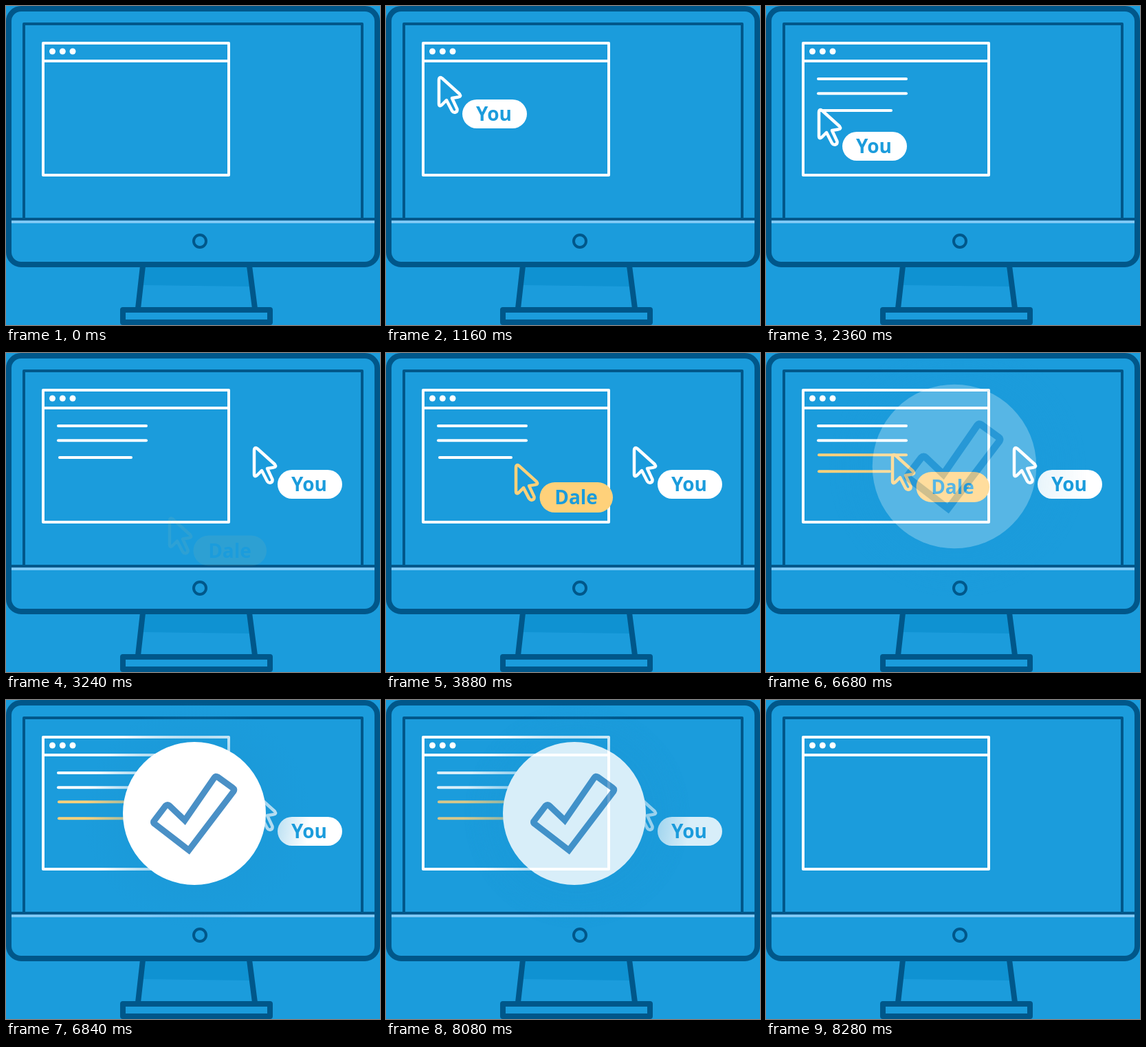
Write an HTML page that moves like this. It is 544 by 464 pixels and loops after 9520 ms.

```html
<!DOCTYPE html>
<html lang="en">
<head>
<meta charset="utf-8">
<title>Working together</title>
<style>
html, body { margin: 0; height: 100%; overflow: hidden; background: #1b9cdc; }
svg { display: block; width: 544px; height: 464px; }
text { font: 700 28px "Open Sans", "Noto Sans", sans-serif; fill: #1b9cdc; text-anchor: middle; }
#lines path { stroke-width: 4; stroke-linecap: round; }
</style>
</head>
<body>
<svg viewBox="0 0 544 464" fill="none">
  <defs>
    <path id="arrow" stroke-width="4.5" stroke-linejoin="round"
      d="M3 7Q3 1 7.5 4L33 27Q36 31 31 31.5L22 33L29.500 49Q30 52.500 27 53.500Q24 54.500 22 51.500L14 36L7 43Q3 46 3 41Z"/>
    <radialGradient id="glow">
      <stop offset=".6" stop-color="#1b97d5" stop-opacity=".4"/>
      <stop offset="1" stop-color="#1b97d5" stop-opacity="0"/>
    </radialGradient>
  </defs>

  <!-- monitor -->
  <path fill="#0f92d2" d="M201 380H353L356 408L199 406Z"/>
  <g stroke="#00578a">
    <path stroke-width="8" d="M199 378L192 440M354 378L362 440"/>
    <rect x="170" y="442" width="214" height="18" stroke-width="8" stroke-linejoin="round"/>
    <rect x="4" y="4" width="536" height="372" rx="18" stroke-width="8"/>
    <path stroke-width="4" stroke-linejoin="round" d="M26 310V26H518V310M8 310H536"/>
    <circle cx="282" cy="342" r="9" stroke-width="4"/>
  </g>
  <path stroke="#7fc8f5" stroke-width="4" d="M8 314H536"/>

  <!-- window -->
  <path stroke="#fff" stroke-width="4" stroke-linejoin="round" d="M54 54H324V246H54ZM54 80H324"/>
  <g fill="#fff">
    <circle cx="67.500" cy="66" r="4.500"/><circle cx="82.300" cy="66" r="4.500"/><circle cx="97" cy="66" r="4.500"/>
  </g>

  <g id="action">
    <g id="lines"></g>
    <g id="you">
      <use href="#arrow" stroke="#fff"/>
      <rect x="37" y="35" width="94" height="42" rx="21" fill="#fff"/>
      <text x="83" y="65.500">You</text>
    </g>
    <g id="mate">
      <use href="#arrow" stroke="#ffd17a"/>
      <rect x="37.500" y="28" width="106.500" height="44" rx="22" fill="#ffd17a"/>
      <text x="90.500" y="60">Dale</text>
    </g>
    <g id="done">
      <circle cx="278" cy="168" r="165" fill="url(#glow)"/>
      <circle cx="274" cy="165" r="104" fill="#fff"/>
      <path stroke="#4a90c6" stroke-width="9"
        d="M260 175L238 154Q235 151 232 154L216 175Q213 178 216 180L266 218.500L331 133Q333 130 330 128L308 112Q305 110 303 113Z"/>
    </g>
  </g>
</svg>
<script>
const LOOP = 9520, STEP = 40;
const $ = id => document.getElementById(id);
const clamp = v => Math.min(1, Math.max(0, v));
const ease = (p, n) => p < .5 ? (2 * p) ** n / 2 : 1 - (2 - 2 * p) ** n / 2;

// progress of a change whose first of n steps shows at `start`
const prog = (t, start, n) => clamp(((t - start) / STEP + 1) / n);

const lines = [
  { y: 106, x0: 76, x1: 204, start: 1320, color: '#fff' },
  { y: 127.2, x0: 76, x1: 204, start: 1720, color: '#fff' },
  { y: 152, x0: 78, x1: 182, start: 2240, color: '#fff', erase: 4080 },
  { y: 148.3, x0: 77, x1: 204, start: 4800, color: '#ffd17a' },
  { y: 172.3, x0: 77, x1: 180, start: 5440, color: '#ffd17a' }
];
for (const l of lines) {
  l.el = document.createElementNS('http://www.w3.org/2000/svg', 'path');
  l.el.setAttribute('stroke', l.color);
  $('lines').append(l.el);
}

const youMoves = [
  { start: 920, n: 7, to: [74, 101] },
  { start: 2000, n: 3, to: [74, 148] },
  { start: 2480, n: 14, to: [358, 135] }
];
const mateMoves = [{ start: 3720, n: 7, to: [181, 145] }];

function place(t, [x, y], moves) {
  for (const { start, n, to } of moves) {
    const p = prog(t, start, n);
    x += (to[0] - x) * ease(p, 3);
    y += (to[1] - y) * ease(p, 2);
  }
  return [x, y];
}

// fade in while swelling around (cx, cy) and settling back
function pop(id, t, start, n, swell, [x, y], cx, cy) {
  const p = clamp((t - start) / STEP / (n - 1));
  const s = 1 + swell * Math.sin(Math.PI * p);
  $(id).setAttribute('opacity', t < start ? 0 : .08 + .92 * p);
  $(id).setAttribute('transform',
    `translate(${x + cx} ${y + cy}) scale(${s}) translate(${-cx} ${-cy})`);
}

function draw(time) {
  const t = Math.floor(time % LOOP / STEP) * STEP;
  for (const l of lines) {
    let p = prog(t, l.start, 4);
    if (l.erase) p -= prog(t, l.erase, 6) * p;
    l.el.setAttribute('d', p > 0 ? `M${l.x0} ${l.y}H${l.x0 + (l.x1 - l.x0) * p}` : '');
  }
  pop('you', t, 400, 5, .36, place(t, [226, 214], youMoves), 66, 39);
  pop('mate', t, 3240, 5, .37, place(t, [235, 237.5], mateMoves), 72, 36);
  pop('done', t, 6640, 6, .25, [0, 0], 274, 165);
  $('action').setAttribute('opacity', 1 - prog(t, 8080, 6));
}

const begin = performance.now();
function tick() {
  draw(performance.now() - begin);
  requestAnimationFrame(tick);
}
tick();
</script>
</body>
</html>
```
